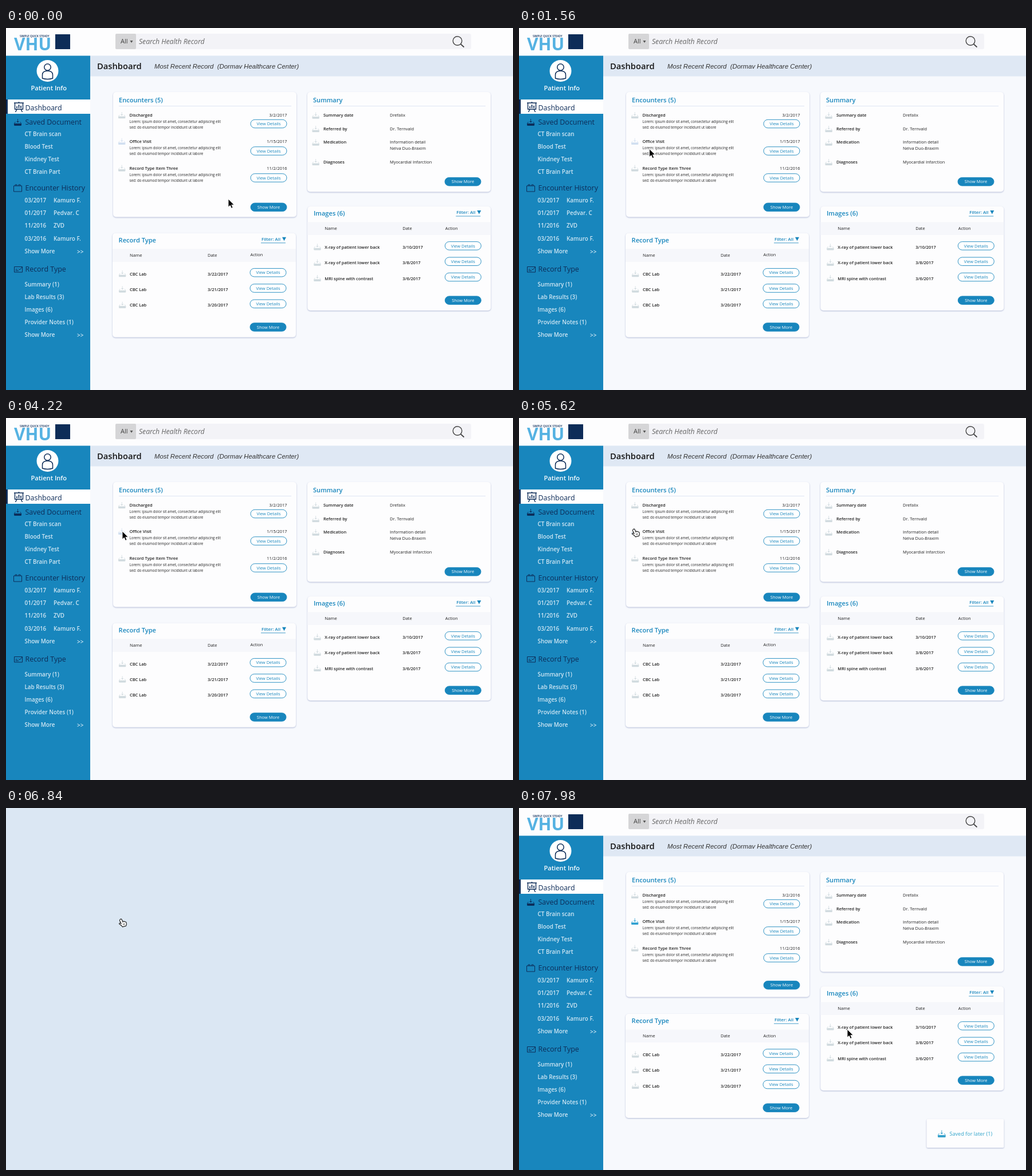
Animation, 885 px wide and 633 px high, one loop 8000 ms. Source, as an HTML page:

```html
<!DOCTYPE html>
<html lang="en">
<head>
<meta charset="utf-8">
<title>Patient dashboard</title>
<style>
  html, body { margin: 0; width: 100%; height: 100%; overflow: hidden; background: #dbe7f3; }
  svg { display: block; width: 885px; height: 633px; font-family: "Open Sans", sans-serif; }
  text { white-space: pre; }
  .card { fill: #fdfdfe; filter: drop-shadow(0 1px 1px #b1b9d6); }
</style>
</head>
<body>
<svg id="stage" viewBox="0 0 885 633"></svg>
<script>
const LOOP = 8000;
const BLUE = '#1886bd', NAVY = '#0d2c58', INK = '#222', PALE = '#d0dadf', LINK = '#d0e7f4';

// y is the middle of the capital letters
const text = (x, y, str, size = 7.45, fill = INK, attrs = '') =>
  `<text x="${x}" y="${(y + size * 0.36).toFixed(2)}" font-size="${size}" fill="${fill}" ${attrs}>${str}</text>`;
const bold = (x, y, str, size, fill) => text(x, y, str, size, fill, 'font-weight="600"');
const rect = (x, y, w, h, fill, attrs = '') =>
  `<rect x="${x}" y="${y}" width="${w}" height="${h}" fill="${fill}" ${attrs}/>`;
const line = (d, stroke, width = 1, fill = 'none') =>
  `<path d="${d}" fill="${fill}" stroke="${stroke}" stroke-width="${width}"/>`;
const at = (x, y, body, scale = 1) => `<g transform="translate(${x} ${y}) scale(${scale})">${body}</g>`;

const tray = (x, y, color = PALE, scale = 0.88) => at(x, y,
  line('M.5 8.5V12H13.5V8.5L11.5 5.5M.5 8.5L2.5 5.5', color, 0.9) +
  line('M1 9H13V12H1ZM7 0V6M5 4.5L7 6.5L9 4.5', color, 0.9, color), scale);

const card = (x, y, h) => rect(x, y, 320, h, '#fff', 'rx="5" class="card"');
const heading = (x, y, str) => bold(x, y, str, 11.1, BLUE);

function button(x, y, label, solid) {
  return rect(x, y - 7.25, 63, 14.5, solid ? BLUE : '#fff', `rx="7.25" stroke="${BLUE}" stroke-width=".9"`) +
    text(x + 31.5, y, label, 7.5, solid ? '#fff' : BLUE, 'text-anchor="middle"');
}
const details = (x, y) => button(x, y, 'View Details');
const more = (x, y) => button(x, y, 'Show More', true);

function table(x, y, h, title, rows) {
  let out = card(x, y, h) + heading(x + 10.6, y + 12.2, title) +
    bold(x + 260, y + 10.2, 'Filter: All', 7.8, BLUE) +
    `<path d="M${x + 296} ${y + 7}h7l-3.5 6.5z" fill="${BLUE}"/>` +
    line(`M${x + 259} ${y + 17}h43`, BLUE, 0.8) +
    rect(x, y + 27.5, 320, 22.5, '#f6f7fb') +
    text(x + 30, y + 38.5, 'Name', 7.7) + text(x + 166, y + 38.5, 'Date') + text(x + 240.5, y + 38, 'Action');
  rows.forEach(([name, date], i) => {
    const cy = y + 71.3 + i * 27.3;
    out += tray(x + 11, cy - 6) + bold(x + 30, cy, name) + bold(x + 166, cy, date) + details(x + 240, cy - 2.4);
  });
  return out + more(x + 240, y + h - 17.8);
}

function header() {
  return rect(0, 0, 885, 48.5, '#fdfdfe') +
    bold(24, 14, 'SIMPLE QUICK STEADY', 4.8, NAVY) +
    text(14, 28, 'VHU', 30, '#55b2e2', 'font-weight="700"') +
    rect(86, 11, 26, 26, NAVY) +
    rect(191, 10, 621, 27, '#f3f3f7', 'rx="3"') + rect(191, 10, 36, 27, '#d5d5d7', 'rx="2"') +
    text(200, 23.5, 'All', 11, '#444') + '<path d="M216.500 22h5l-2.500 4z" fill="#555"/>' +
    text(232, 23.5, 'Search Health Record', 12.2, '#666', 'font-style="italic"') +
    '<circle cx="788" cy="22.500" r="7.800" fill="none" stroke="#444" stroke-width="1.400"/>' +
    line('M793.500 28L799.500 33.500', '#444', 1.7) +
    rect(147, 48.5, 738, 36, '#dfe8f4') +
    bold(159, 67, 'Dashboard', 14.7, '#151515') +
    text(259, 67, 'Most Recent Record  (Dormav Healthcare Center)', 11.35, '#333',
      'font-style="italic" style="font-family:\'Liberation Sans\',sans-serif"');
}

function sidebar() {
  const item = (y, str) => bold(32.5, y, str, 9.9, LINK);
  const section = (y, str) => text(33.5, y, str, 12.45, NAVY);
  let out = rect(0, 48.5, 147, 584.5, BLUE) +
    '<circle cx="72.500" cy="75" r="19" fill="#fff"/>' +
    `<circle cx="72.500" cy="68.500" r="5.700" fill="none" stroke="${NAVY}" stroke-width="1.500"/>` +
    line('M63.500 88V82C63.500 77 67 75 72.500 75S81.500 77 81.500 82V88Q72.500 91 63.500 88Z', NAVY, 1.5) +
    bold(43.5, 105, 'Patient Info', 11.1, '#fff') +
    rect(0, 125, 147, 25, '#fff') + rect(0, 125, 3, 25, NAVY) +
    line('M14 131H31M15.500 131V142H29.500V131M22.500 129V131M19 142L16.500 147M26 142L28.500 147', NAVY, 1.4) +
    line('M19 140V137M22.500 140V134M26 140V136', NAVY, 1.7) +
    section(140, 'Dashboard') +
    tray(14, 159, NAVY, 0.93) + section(165, 'Saved Document') +
    line('M13.500 276H27.500V286H13.500ZM16 276V274H19V276M22 276V274H25V276', NAVY) +
    section(280, 'Encounter History') +
    line('M14.500 417.500H28.500V427H14.500ZM16.500 422H20M16.500 424.500H22M22 421L24 423L28 418', NAVY) +
    section(421.5, 'Record Type');
  ['CT Brain scan', 'Blood Test', 'Kindney Test', 'CT Brain Part'].forEach((s, i) => out += item(185.5 + i * 22, s));
  [['03/2017', 'Kamuro F.'], ['01/2017', 'Pedvar. C'], ['11/2016', 'ZVD'], ['03/2016', 'Kamuro F.']]
    .forEach(([date, who], i) => {
      const y = 301.7 + i * 22.1;
      out += item(y, date) + bold(83, y, who, 9.9, LINK);
    });
  ['Summary (1)', 'Lab Results (3)', 'Images (6)', 'Provider Notes (1)', 'Show More']
    .forEach((s, i) => out += item(448 + i * 22, s));
  out += item(390, 'Show More');
  for (const y of [391.5, 537.5]) out += bold(124, y, '&gt;&gt;', 9.9, LINK);
  return out;
}

function encounters(saved) {
  let out = card(187, 112, 218.5) + heading(197, 125.5, 'Encounters (5)') + line('M197 136.500H498', '#dfe5f4');
  [['Discharged', saved ? '3/2/2016' : '3/2/2017', 152.5, 167.5],
   ['Office Visit', '1/15/2017', 198.3, 215],
   ['Record Type Item Three', '11/2/2016', 245, 262]].forEach(([name, date, y, by], i) => {
    out += tray(196, y - 5.5, i !== 1 ? PALE : saved ? '#2c9fd0' : '#d0dff0') + bold(215.5, y, name) +
      text(490.5, y, date, 7.45, INK, 'text-anchor="end"') +
      text(215.5, y + 11.5, 'Lorem: ipsum dolor sit amet, consectetur adipiscing elit', 6.2) +
      text(215.5, y + 21.3, 'sed: do eiusmod tempor incididunt ut labore', 6.2) +
      details(427, by);
  });
  return out + more(427, saved ? 309.7 : 313.3);
}

function summary() {
  let out = card(526, 112, 174.5) + heading(536, 125.5, 'Summary') + line('M536 136.500H837', '#dfe5f4');
  [['Summary date', 'Drefalix', 152.5], ['Referred by', 'Dr. Ternvald', 176],
   ['Medication', 'Information detail', 199.5], ['Diagnoses', 'Myocardial Infarction', 234]]
    .forEach(([label, value, y]) => out += tray(534.5, y - 5) + bold(554, y, label) + text(670, y, value));
  return out + text(670, 210.5, 'Nelva Duo-Braxim') + more(766, 268.7);
}

function page(saved) {
  const labs = ['3/22/2017', '3/21/2017', '3/20/2017'].map(date => ['CBC Lab', date]);
  const images = [['X-ray of patient lower back', '3/10/2017'], ['X-ray of patient lower back', '3/8/2017'],
    ['MRI spine with contrast', '3/6/2017']];
  const toast = rect(711.5, 544, 135, 50, '#fff', 'rx="2" class="card"') +
    tray(731, 563.5, '#35a0cb', 0.98) + text(751.5, 569.7, 'Saved for later (1)', 9.1, '#2fa3ca');
  return rect(0, 0, 885, 633, '#f7f9fd') + header() + sidebar() + encounters(saved) + summary() +
    table(186, saved ? 360 : 358.8, 182, 'Record Type', labs) +
    table(526.3, 312, 182, 'Images (6)', images) + (saved ? toast : '');
}

const arrow = line('M0 0V14.200L3.300 11.200L5.500 16.300L8 15.200L5.800 10.300H10.200Z', '#fff', 0.9, '#000');
const hand = at(-6, -5,
  line('M2.500 1.500c1-.9 2.200-.4 2.700.7l1.400 3.300c.6-.8 1.700-.7 2.100.1 .7-.6 1.700-.4 2.100.5 .9-.4 1.900.1 2.100 1.100l.5 3.200-1 3-6 1.400-2-2.300-3.600-2.600c-.6-1.200.5-1.900 1.600-1.500l1.500.6-2.400-5c-.3-.7 0-1.300.4-1.600z', '#111', 1.1, '#fff') +
  line('M7.500 9l.8 3M9.500 8.500l.7 3M6.500 5.500l.6 2', '#111', 0.7));

const stage = document.getElementById('stage');
stage.innerHTML = `<g id="before">${page(false)}</g><g id="after">${page(true)}</g>` +
  `<g id="cursor"><g id="arrow">${arrow}</g><g id="hand">${hand}</g></g>`;
const part = id => document.getElementById(id);
const show = (id, on) => part(id).style.display = on ? '' : 'none';

const ease = (t, from, to) => {
  const p = Math.min(1, Math.max(0, (t - from) / (to - from)));
  return p * p * (3 - 2 * p);
};

// The blank stage shows only briefly while the next page loads
const POINT = 4900, LOAD = 6835, LOADED = 6880, LEAVE = 7200;

function draw(t) {
  const come = ease(t, 250, 1950), leave = ease(t, LEAVE, 7980);
  const x = 388 - 185 * come + 370 * leave;
  const y = 299 - 101 * come + 189 * leave;
  part('cursor').setAttribute('transform', `translate(${x.toFixed(1)} ${y.toFixed(1)})`);
  const pointing = t >= POINT && t < LEAVE + 60;
  show('hand', pointing);
  show('arrow', !pointing);
  show('before', t < LOAD);
  show('after', t >= LOADED);
}

const start = performance.now();
function tick() {
  draw((performance.now() - start) % LOOP);
  requestAnimationFrame(tick);
}
tick();
</script>
</body>
</html>
```
